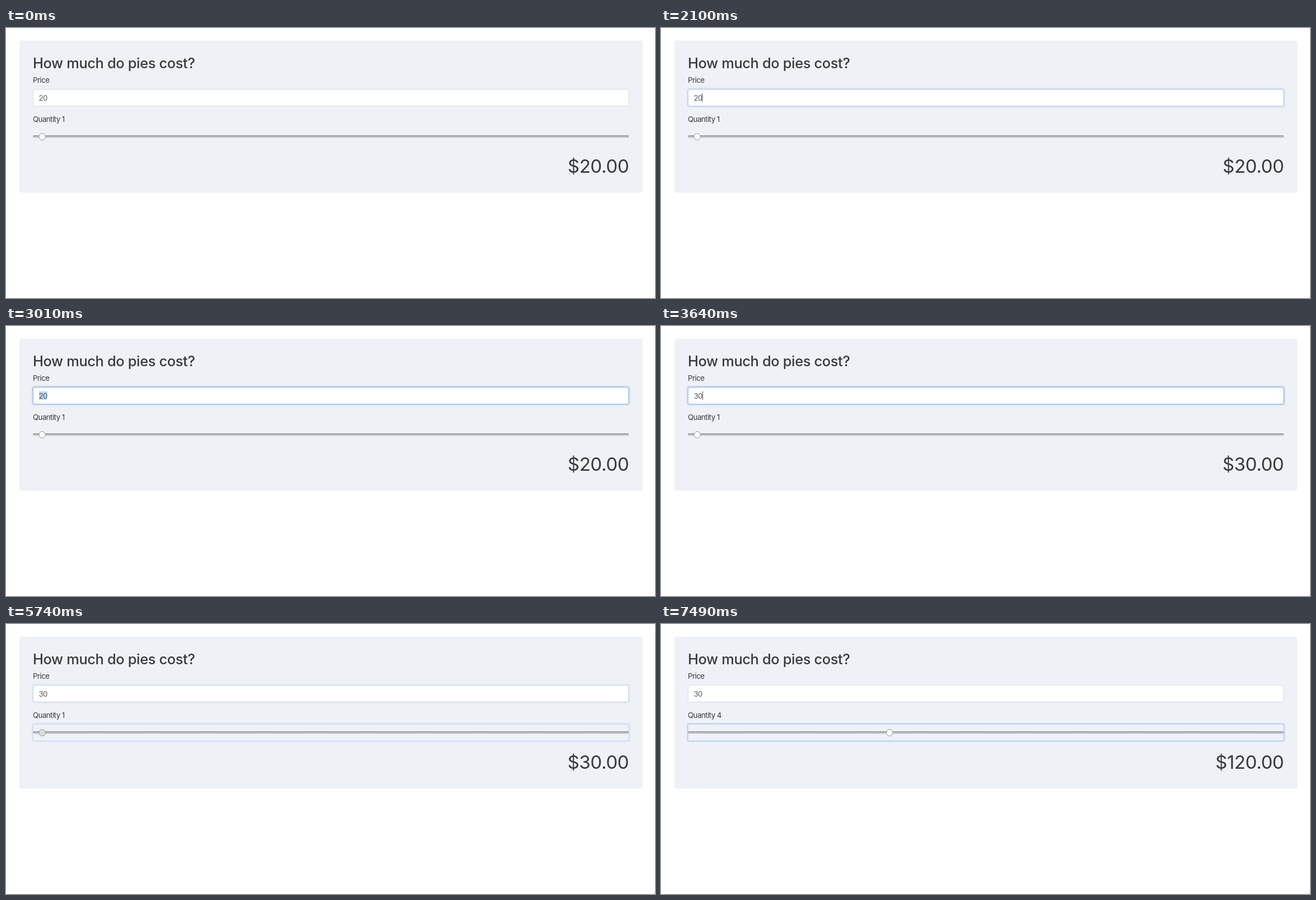
An HTML page that plays this animation: 1159 by 483 pixels, repeating every 8 s.

```html
<!DOCTYPE html>
<html lang="en">
<head>
<meta charset="utf-8">
<title>Pie cost</title>
<style>
  html, body { margin: 0; width: 100%; height: 100%; overflow: hidden; background: #fff; }
  svg { display: block; width: 1159px; height: 483px; }
  text { font-family: Inter, "Open Sans", sans-serif; font-optical-sizing: none; fill: #373a3c; white-space: pre; }
  .title { font-size: 25.3px; font-weight: 500; letter-spacing: -.3px; }
  .label { font-size: 13.2px; letter-spacing: -.5px; }
  .value { fill: #55595c; }
  .total { font-size: 33px; letter-spacing: -.4px; text-anchor: end; }
  .ring { fill: none; stroke: #c3d7f5; stroke-width: 2.8; }
</style>
</head>
<body>
<svg viewBox="0 0 1159 483">
  <defs>
    <linearGradient id="groove" x1="0" y1="0" x2="0" y2="1">
      <stop offset="0" stop-color="#8f9193"/>
      <stop offset=".35" stop-color="#a2a4a6"/>
      <stop offset=".5" stop-color="#c6c8ca"/>
      <stop offset="1" stop-color="#bbbdbf"/>
    </linearGradient>
  </defs>
  <rect width="1159" height="483" fill="#fff"/>
  <path d="M1158 0h1v1h-1zM1158 482h1v1h-1z" fill="#a5a5a5"/>
  <rect x="24" y="22.6" width="1112.6" height="272" rx="4" fill="#eef1f5"/>
  <text class="title" x="48" y="71.8">How much do pies cost?</text>
  <text class="label" x="48" y="98.2">Price</text>

  <rect id="priceRing" class="ring" x="47.2" y="108.5" width="1066" height="32.2" rx="4"/>
  <rect x="48.5" y="109.9" width="1063.2" height="29.6" rx="3" fill="#fff" stroke="#dadee3"/>
  <rect id="priceEdge" x="48.5" y="109.9" width="1063.2" height="29.6" rx="3" fill="none" stroke="#a4c1ec"/>
  <rect id="selection" x="59" y="117" width="14.5" height="15" fill="#b9d5f6"/>
  <text id="price" class="label value" x="58.4" y="129.8"></text>
  <rect id="caret" y="117" width="1" height="15" fill="#45494c"/>

  <text id="quantity" class="label" x="48" y="167.6"></text>
  <rect id="rangeRing" class="ring" x="47.4" y="178.6" width="1065.6" height="31" rx="3.5"/>
  <rect x="48" y="192" width="1064.3" height="4.3" rx="1.5" fill="url(#groove)"/>
  <circle id="thumb" cy="194.5" r="5.8" stroke="#929496"/>
  <text id="total" class="total" x="1112.3" y="258.8"></text>
</svg>
<script>
  const LOOP = 8000;
  const el = id => document.getElementById(id);
  const set = (id, attr, value) => el(id).setAttribute(attr, value);
  const show = (id, amount) => set(id, 'opacity', Number(amount));

  // Latest value whose start time has passed.
  const at = (t, steps) => steps.reduce((v, [start, next]) => t >= start ? next : v, null);

  const price = [[0, 20], [3500, 3], [3640, 30]];
  const quantity = [[0, 1], [6370, 2], [6860, 3], [7140, 4]];
  const priceFocus = [[0, 0], [2030, .12], [2100, .55], [2170, 1], [5670, .75], [5740, .3], [5810, 0]];
  const rangeFocus = [[0, 0], [5740, .6], [5810, 1]];
  const caretOn = [[0, 0], [2030, 1], [2520, 0], [3500, 1], [4130, 0], [4620, 1], [5180, 0]];
  const caretX = [[0, 73], [3500, 66], [3640, 74]];
  const selected = [[0, 0], [2730, 1], [3500, 0]];
  const pressed = [[0, 0], [5670, 1], [7350, 0]];

  function draw(t) {
    const p = at(t, price), q = at(t, quantity);
    el('price').textContent = p;
    el('quantity').textContent = 'Quantity ' + q;
    el('total').textContent = '$' + (p * q).toFixed(2);
    show('priceRing', at(t, priceFocus));
    show('priceEdge', at(t, priceFocus));
    show('rangeRing', at(t, rangeFocus));
    show('selection', at(t, selected));
    show('caret', at(t, caretOn));
    set('caret', 'x', at(t, caretX));
    set('thumb', 'cx', 64.7 + 114.5 * (q - 1));
    set('thumb', 'fill', at(t, pressed) ? '#dcdddf' : '#fbfbfc');
  }

  const start = performance.now();
  function tick() {
    draw((performance.now() - start) % LOOP);
    requestAnimationFrame(tick);
  }
  draw(0);
  requestAnimationFrame(tick);
</script>
</body>
</html>
```
